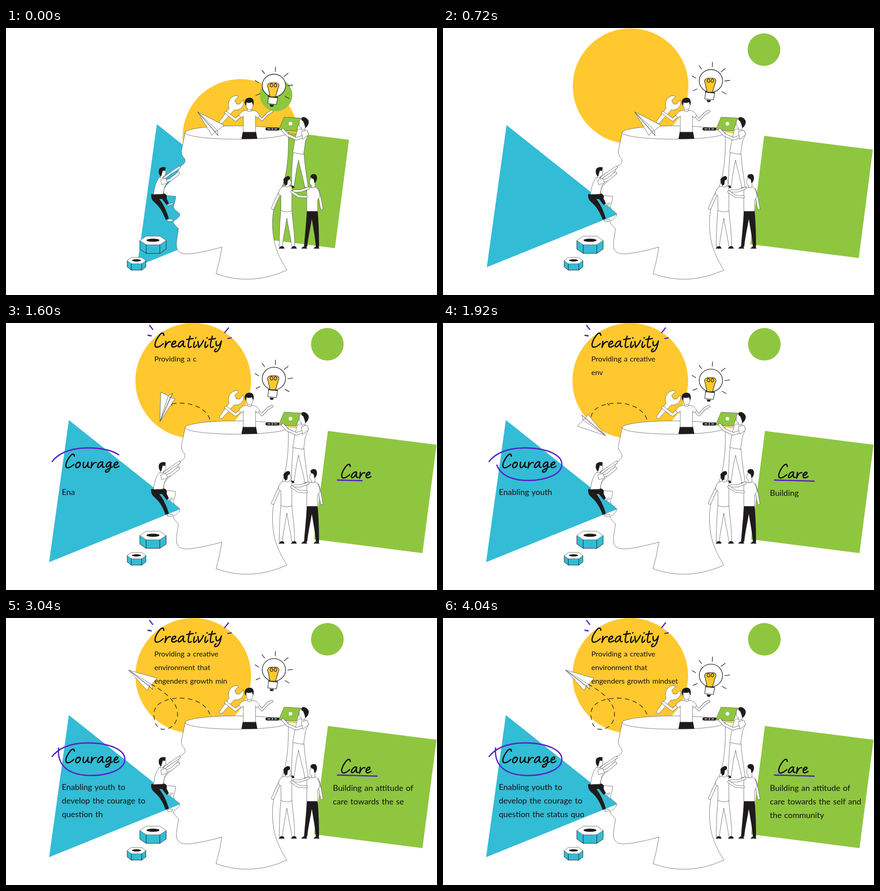
Write an HTML page that moves like this. It is 950x590 px and loops after 8000 ms.

```html
<!DOCTYPE html>
<html lang="en">
<head>
<meta charset="utf-8">
<title>Creativity, Courage, Care</title>
<style>
  html, body { margin: 0; width: 100%; height: 100%; overflow: hidden; background: #fff; }
  svg { display: block; width: 950px; height: 590px; }
  .w { fill: #fff; stroke: #555; stroke-width: .8; stroke-linejoin: round; }
  .k { fill: #1f1b1d; }
  .cyan { fill: #33bcd5; }
  .green { fill: #8fc640; }
  .yellow { fill: #ffc82f; }
  .line { fill: none; stroke: #1a1a1a; stroke-width: 1.3; stroke-linecap: round; }
  .limb { fill: none; stroke-linecap: round; stroke-linejoin: round; }
  .pen { fill: none; stroke: #5522c8; stroke-width: 2.8; }
  .script { fill: none; stroke: #0c0c0c; stroke-width: 2.7; stroke-linecap: round; stroke-linejoin: round; }
  text { font-family: Lato, "Open Sans", sans-serif; word-spacing: 1.2px; fill: #111; white-space: pre; }
</style>
</head>
<body>
<script>
const CYCLE = 8000, STILL = 4040, STEP = 40;

const path = (d, cls = 'w', extra = '') => `<path d="${d}" class="${cls}" ${extra}/>`;
const oval = (x, y, rx, ry, cls = 'w', extra = '') =>
  `<ellipse cx="${x}" cy="${y}" rx="${rx}" ry="${ry}" class="${cls}" ${extra}/>`;
const limb = (d, w) =>
  path(d, 'limb', `stroke="#555" stroke-width="${w + 1.6}"`) +
  path(d, 'limb', `stroke="#fff" stroke-width="${w}"`);

// Hexagonal nut: half widths of the rim and flat side, half height, depth
const nut = (x, y, a, b, h, depth) =>
  path(`M${x - a} ${y}v${depth}l${a - b} ${h}h${2 * b}l${a - b} ${-h}v${-depth}z`, 'cyan', 'stroke="#222"') +
  path(`M${x - a} ${y}l${a - b} ${-h}h${2 * b}l${a - b} ${h}l${b - a} ${h}h${-2 * b}z`, 'w') +
  path(`M${x - b} ${y + h}v${depth}M${x + b} ${y + h}v${depth}`, 'line', 'style="stroke-width:1"') +
  oval(x, y - .5, a * .49, h * .36, 'k');

const shoe = (x, y) => path(`M${x - 6} ${y + 2.5}Q${x - 5} ${y - 1} ${x + 1} ${y - 3}L${x + 5} ${y - 2}L${x + 7} ${y + 2.5}Z`, 'k');

const head = path(`M395 231L388 265C385 275 387 282 393 288C397 294 394 300 385 305C378 320 366 335 356 345
  C348 352 346 362 349 368C352 371 365 371 374 372C374 382 370 388 369 396C372 404 380 406 383 411
  C384 418 375 422 368 428C371 436 377 440 380 443C379 460 373 475 377 488C382 498 390 500 405 499
  C430 496 455 490 476 484Q471 515 463 543Q540 571 619 535C605 512 594 490 590 465
  C584 425 588 390 605 360C618 330 624 290 622 231Z`) + oval(508.5, 231, 113.5, 14.7);

const inventor =
  path(`M471 206L492 177C487 166 493 150 510 149L512 152L504 160L508 168L515 168L523 159
    C527 172 516 183 503 181L477 210Q470 214 471 206Z`) +
  limb('M518 193L506 203L485 187', 5) +
  limb('M555 193L564 203L577 189L586 184', 4) +
  path('M519 245L522 229H551L554 245Z', 'k') +
  path('M531 182C524 182 518 184 513 194L520 199L523 194V230H550V194L553 199L559 194C556 185 549 182 543 182Q537 187 531 182Z') +
  path('M532 176V183Q537 187 541 183V176Z') + oval(537, 170, 7.5, 11) +
  path('M528 172C523 160 529 154 537 154C545 154 548 161 545 171L542 164Q535 167 530 164Z', 'k');

const carrier =
  path('M621 227L641 230L640 233L622 230Z', 'yellow') +
  path('M613 197L650 199L640 228L601 225Z', 'green', 'stroke="#444" stroke-width=".7"') +
  oval(627, 211.5, 4, 4, '', 'fill="#fff"') +
  path('M633 275L657 278C658 300 663 330 666 352L659 354C655 330 648 310 645 292C640 310 638 330 635 350L629 349C630 320 630 300 633 275Z') +
  shoe(629, 351) + shoe(660, 355) +
  path('M643 225C650 221 661 222 667 234L660 250L656 279Q644 278 632 275C635 258 637 240 643 225Z') +
  limb('M657 239L640 245L620 236L610 225', 5) +
  path('M651 229L664 226L667 236L654 246Z') +
  path('M649 201C645 208 645 219 651 220L652 226L659 224L660 208Z') +
  path('M651 199C655 195 663 197 667 205C668 212 665 217 660 221L658 214L655 206Q651 205 651 199Z', 'k');

const helperLeft =
  path('M606 402H630C632 430 637 455 636 482L630 483C627 460 622 440 619 420C616 440 611 462 609 483L602 483C603 455 603 430 606 402Z') +
  shoe(607, 485) + shoe(634, 485) +
  limb('M607 357L594 384L588 398', 5) +
  path('M612 350C606 351 602 357 600 367L606 371V403Q618 409 630 404V350Q620 347 612 350Z') +
  path('M616 341V350Q622 354 625 348L628 345Q629 337 625 333Z') +
  path('M612 338C610 333 614 332 617 329C621 326 627 327 626 333C625 336 621 335 621 339L620 346L616 348C613 345 612 342 612 338Z', 'k') +
  limb('M635 360L649 360L666 354', 4) + limb('M630 362L645 372L662 373', 4);

const helperRight =
  path('M663 404H687C689 430 690 455 690 483L683 483C681 460 677 440 674 422C671 442 666 462 664 483L657 483C659 455 662 430 663 404Z', 'k') +
  shoe(657, 485) + shoe(684, 485) +
  limb('M687 358C692 370 693 385 696 399', 4.5) +
  path('M668 351C664 354 663 358 663 364V405H687V379L692 374C691 362 688 353 681 351Q675 355 668 351Z') +
  path('M672 331C668 338 669 347 673 347V352Q677 355 681 350V335Z') +
  path('M671 329C671 324 677 321 683 324C688 330 685 339 680 343L678 334Q674 333 671 329Z', 'k');

const climber =
  limb('M349 331L364 320L382 308', 4) +
  path(`M320 367L349 366C355 368 355 373 354 377L359 387L354 391L344 378L338 378C347 389 353 402 359 421
    L352 424C346 408 340 396 327 385C321 380 319 373 320 367Z`, 'k') +
  path('M338 330C346 330 353 333 357 339L350 350L346 367L325 368C327 352 331 338 338 330Z') +
  limb('M346 341L363 335L380 321', 5) +
  path('M341 336L352 332L356 343L343 346Z') +
  path('M342 315L340 331Q346 333 347 328C352 327 353 319 352 314Z') +
  path('M337 314C338 308 346 306 352 308L351 315Q347 317 346 314L342 328C337 325 336 319 337 314Z', 'k') +
  path('M356 391Q361 389 366 386Q370 388 366 390L357 393Z') + path('M355 424Q361 421 367 423Q369 426 366 427H356Z');

const bulb =
  path(`M594 86L593.5 96M564.5 93.5L570 101M622 100L613 107M549 116L557 121M632 126L621 127.5
    M560 145L551 149M615 151L624 156`, 'line') +
  path('M579 150L599 153L596 169L577 167Z', 'w', 'style="stroke:#1a1a1a;stroke-width:1.1"') +
  path('M581 169L591 170L588 174H583Z', 'k') +
  oval(590.5, 127, 25.7, 25, 'w', 'style="stroke:#1a1a1a;stroke-width:1.3"') +
  path('M582 152L578 133C574 125 579 121 586 121H594C602 121 603 127 600 132L594 152Z', 'yellow', 'stroke="#222" stroke-width="1.2"') +
  path('M582 127C584 133 589 130 588 126C587 121 583 122 582 127M597 127C595 133 590 130 591 126C592 121 596 122 597 127', 'line') +
  path('M578 152L598 154', 'line');

const plane =
  path('M0 0L63 18L51 32L54 43L46 35L41 45Z') + path('M0 0L51 32L46 35ZM0 0L54 43', 'w');

const trail = 'M449.500 213C444 195 420 177 385 177C350 177 326 190 326 212C326 235 335 246 347 246C365 246 378 232 378 212C378 185 350 160 302 137';

// Pen strokes of each hand-lettered glyph, with its advance
const GLYPHS = {
  C: [21, 'M20 -26C19 -33 14 -32 9 -24C3 -15 0 -4 5 -1C10 1 16 -4 20 -8'],
  r: [13, 'M3 -13C3 -9 3 -4 2 0C4 -7 8 -14 13 -12'],
  e: [13, 'M2 -7C6 -6 11 -9 10 -12C8 -16 2 -11 2 -6C2 1 8 0 13 -4'],
  a: [17, 'M13 -13C8 -16 2 -9 2 -3C3 2 10 -3 13 -12C12 -7 12 0 17 -2'],
  t: [13, 'M8 -24C6 -15 4 -5 6 -1C7 1 10 0 12 -2M1 -17L15 -19'],
  i: [8, 'M4 -12C3 -8 2 -1 4 0C6 0 8 -3 9 -5M6 -20L6.500 -21'],
  v: [14, 'M2 -13C3 -8 4 -3 5 0C9 -4 12 -10 14 -15'],
  y: [16, 'M3 -13C2 -6 5 -2 8 -4C11 -6 13 -10 14 -14C13 -3 10 9 3 9C0 9 0 5 4 3'],
  o: [15, 'M8 -13C3 -13 1 -5 3 -2C6 2 12 -4 12 -9C12 -13 8 -14 7 -11'],
  u: [17, 'M3 -13C2 -6 2 0 6 -1C10 -3 12 -8 13 -13C12 -7 12 0 17 -2'],
  g: [17, 'M13 -12C9 -16 2 -9 3 -4C5 0 11 -5 13 -12C13 -2 12 9 5 9C1 9 1 5 6 3C10 1 14 -1 17 -3']
};

const TITLES = [
  { word: 'Creativity', x: 325.5, y: 54, scale: 1.03, start: 750 },
  { word: 'Courage', x: 129, y: 320.5, scale: 1, start: 1091 },
  { word: 'Care', x: 737, y: 343, scale: 1, start: 1190 }
];

const NOTES = [
  { x: 327, y: 84.5, size: 16.1, start: 1153, pace: 33.3,
    lines: ['Providing a creative', 'environment that', 'engenders growth mindset'] },
  { x: 123, y: 379.5, size: 17.9, start: 1480, pace: 31,
    lines: ['Enabling youth to', 'develop the courage to', 'question the status quo'] },
  { x: 720.5, y: 382, size: 17.9, start: 1646, pace: 33,
    lines: ['Building an attitude of', 'care towards the self and', 'the community'] }
];

const MARKS = [
  ...['M324 15L316 4.500', 'M321 28.500L312 27', 'M481.500 22L491 10', 'M488 34.500L497.500 32.500']
    .map(d => ({ d, from: 1210, to: 1440 })),
  { d: 'M101 307C112 292 135 276 180 276C230 276 262 292 262 312C262 335 225 348 188 348C150 348 111 335 116 286', from: 1340, to: 1965 },
  { d: 'M729.500 347Q775 348 819 349.500', from: 1400, to: 1720 }
];

// Backdrop shapes in their resting place, with their offset at the start
const SHAPES = [
  { svg: oval(412.7, 127.5, 127.5, 127.5, 'yellow'), dx: 104, dy: 113 },
  { svg: path('M138.500 214.500L385 411L95 528.500Z', 'cyan'), dx: 194, dy: -2 },
  { svg: path('M709.500 238.500L949 269L918 508.500L679 478Z', 'green'), dx: -193, dy: -22 },
  { svg: oval(708.3, 47, 36, 36, 'green'), dx: -113, dy: 101 }
];

const lettering = ({ word, x, y, scale }) => {
  let pen = 0;
  const strokes = [...word].map(ch => {
    const [advance, d] = GLYPHS[ch];
    const glyph = path(d, 'script', `transform="translate(${pen}) skewX(-4)"`);
    pen += advance + 1.1;
    return glyph;
  });
  return `<g class="title" role="img" aria-label="${word}" transform="translate(${x} ${y}) scale(${scale})">${strokes.join('')}</g>`;
};

const note = ({ x, y, size, lines }) => lines.map((_, i) =>
  `<text class="note" x="${x}" y="${y + 30 * i}" font-size="${size}"></text>`).join('');

document.body.innerHTML = `<svg viewBox="0 0 950 590">
  <mask id="reveal" maskUnits="userSpaceOnUse" x="0" y="0" width="950" height="590">
    <path id="wipe" d="${trail}" fill="none" stroke="#fff" stroke-width="8"/></mask>
  ${SHAPES.map(s => `<g class="shape">${s.svg}</g>`).join('')}
  ${nut(324, 469.5, 29, 15, 9.5, 19)}${nut(287.7, 514, 20.5, 11.5, 7, 14)}
  ${head}${climber}
  ${path('M575 220H600Q603 220 603 223T600 226.500H575Q572 226 572 223T575 220Z', 'k')}
  ${path('M577 223H582M592 223H597', 'line', 'style="stroke:#fff"')}${oval(587, 223, 1.5, 1.5, '', 'fill="#fff"')}
  ${inventor}${carrier}${helperRight}${helperLeft}
  <g id="bulb">${bulb}</g>
  <path d="${trail}" class="line" stroke-dasharray="10 7.500" style="stroke-linecap:butt" mask="url(#reveal)"/>
  <g id="plane">${plane}</g>
  ${TITLES.map(lettering).join('')}${NOTES.map(note).join('')}
  ${MARKS.map(m => path(m.d, 'pen mark')).join('')}
</svg>`;

const all = selector => [...document.querySelectorAll(selector)];
const [shapes, titles, marks, noteLines] = ['.shape', '.title', '.mark', '.note'].map(all);
const [wipe, planeEl, bulbEl] = ['#wipe', '#plane', '#bulb'].map(s => document.querySelector(s));
const trailLength = wipe.getTotalLength();
const markLengths = marks.map(m => m.getTotalLength());

const ramp = (t, from, to) => Math.min(1, Math.max(0, (t - from) / (to - from)));

const TURNS = [[0, 11], [.13, -21], [.475, -183], [.68, -303], [1, -360]];
const turnAt = p => {
  const i = Math.max(1, TURNS.findIndex(([at]) => at >= p));
  const [[p0, a0], [p1, a1]] = [TURNS[i - 1], TURNS[i]];
  return a0 + (a1 - a0) * ramp(p, p0, p1);
};

function draw(t) {
  const away = (1 - ramp(t, 0, 900)) ** 3;
  SHAPES.forEach((s, i) => shapes[i].setAttribute('transform', `translate(${s.dx * away} ${s.dy * away})`));

  const lift = -6.25 * (1 - Math.cos(Math.PI * t / 1000));
  bulbEl.setAttribute('transform', `translate(0 ${lift})`);

  const flight = ramp(t, 970, 3020);
  const spot = wipe.getPointAtLength(flight * trailLength);
  wipe.setAttribute('stroke-dasharray', `${flight * trailLength} 999`);
  wipe.setAttribute('visibility', flight ? 'visible' : 'hidden');
  planeEl.setAttribute('transform', `translate(${spot.x} ${spot.y}) rotate(${turnAt(flight)}) translate(-32 -22)`);

  TITLES.forEach((title, i) => {
    const count = Math.floor((t - title.start) / 33);
    [...titles[i].children].forEach((glyph, n) =>
      glyph.setAttribute('visibility', n < count ? 'visible' : 'hidden'));
  });

  NOTES.forEach((n, i) => {
    let left = Math.floor((t - n.start) / n.pace);
    n.lines.forEach((line, row) => {
      noteLines[i * 3 + row].textContent = line.slice(0, Math.max(0, left));
      left -= line.length;
    });
  });

  MARKS.forEach((m, i) => {
    const p = ramp(t, m.from, m.to);
    marks[i].setAttribute('stroke-dasharray', `${p * markLengths[i]} 999`);
    marks[i].setAttribute('visibility', p ? 'visible' : 'hidden');
  });
}

const origin = performance.now();
function tick(now) {
  const t = Math.max(0, now - origin) % CYCLE;
  draw(Math.min(STILL, Math.floor(t / STEP) * STEP));
  requestAnimationFrame(tick);
}
draw(0);
requestAnimationFrame(tick);
</script>
</body>
</html>
```
